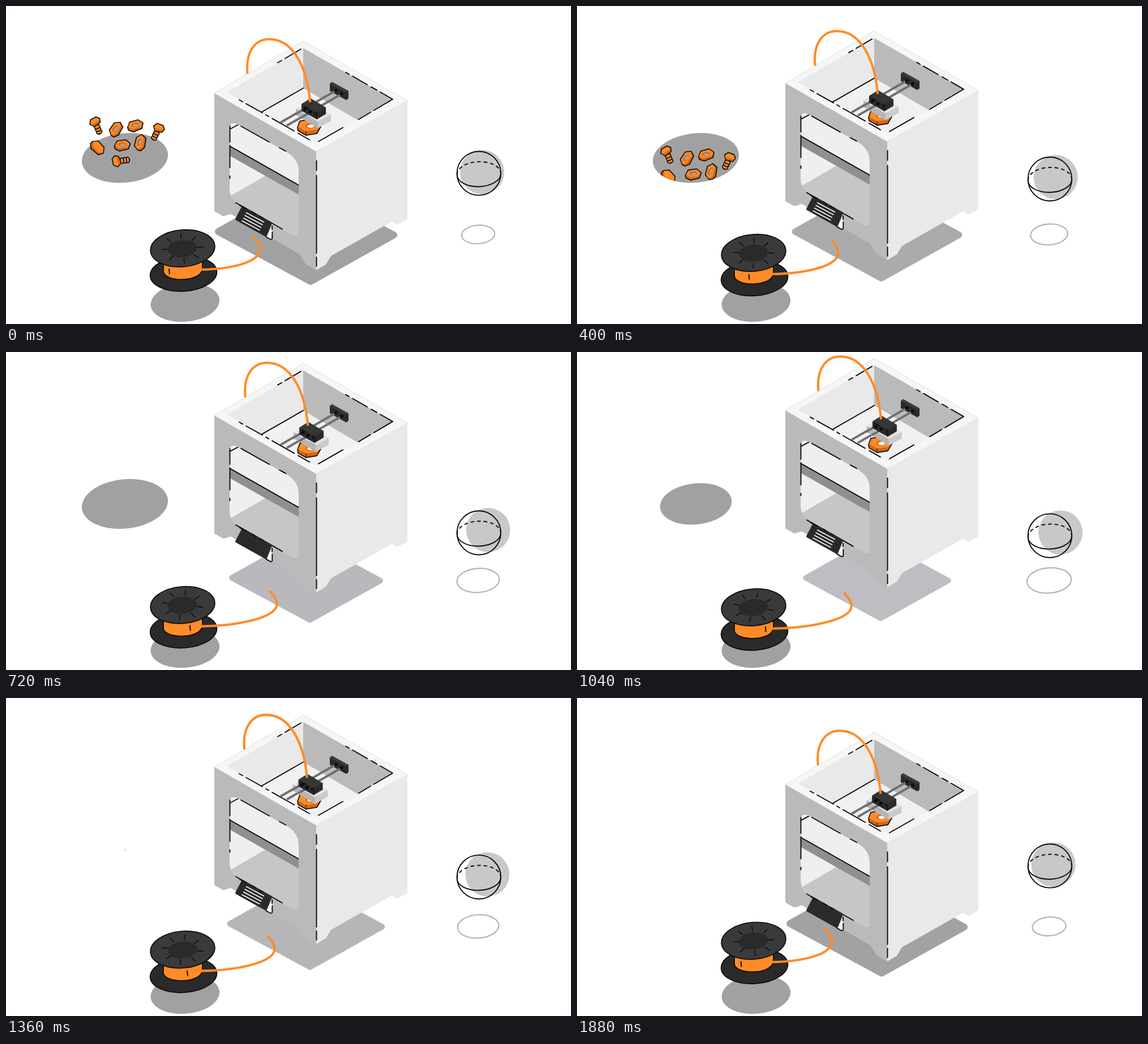
An HTML page that plays this animation: 998 by 561 pixels, repeating every 1920 ms.

```html
<!DOCTYPE html>
<html lang="en">
<head>
<meta charset="utf-8">
<title>3D printer</title>
<style>
  html, body { margin: 0; width: 100%; height: 100%; overflow: hidden; background: #fff; }
  svg { display: block; width: 998px; height: 561px; }
  .line { fill: none; stroke: #0a0a0a; stroke-width: 1.9; stroke-linecap: round; stroke-linejoin: round; }
  .tube { fill: none; stroke: #ff8b27; stroke-width: 4.1; stroke-linecap: round; }
  .part { stroke: #0a0a0a; stroke-width: 1.7; stroke-linejoin: round; }
  .orange { fill: #ff8b27; }
  .rust { fill: #d3671a; }
  .dark { fill: #2a2a2a; }
  .shade { fill: #a1a1a1; }
</style>
</head>
<body>
<svg viewBox="0 0 998 561">
  <defs>
    <clipPath id="above">
      <rect x="100" y="100" width="220" height="166"/>
      <ellipse cx="210" cy="268" rx="76.300" ry="43.600" transform="rotate(-6 210 268)"/>
    </clipPath>
    <clipPath id="window">
      <path d="M395 218Q395 202 409 209L496 258Q517 270 517 292V398Q517 409 505 403L411 349Q395 340 395 322Z"/>
    </clipPath>
    <clipPath id="opening"><path d="M525 74L684 165L549 243L390 152Z"/></clipPath>
  </defs>

  <path id="floorShadow" d="M375 398L522 316L685 404L538 486Z" stroke-width="12" stroke-linejoin="round"/>
  <ellipse class="shade" cx="316.300" cy="523" rx="61" ry="34" transform="rotate(-5 316 523)"/>
  <g id="hole"><ellipse class="shade" rx="76.300" ry="43.600" transform="rotate(-6)"/></g>
  <g clip-path="url(#above)"><g id="parts"></g></g>

  <g id="printer">
    <path fill="#f6f6f6" stroke="#dedede" stroke-width="1" d="M525 62L709 167L548 257L368 154Z"/>
    <g clip-path="url(#opening)">
      <path fill="#e9e9e9" d="M525 74V145L450 188L390 152Z"/>
      <path fill="#bababa" d="M525 74V145L622 202L684 165Z"/>
      <path fill="#f0f0f0" d="M525 145L622 202L549 243L450 188Z"/>
      <path class="line" d="M450 188L525 145"/>
    </g>
    <path fill="#bababa" d="M368 154L548 257V466L529 455L517 436L510 433L404 371L397 367L384 371L368 362Z"/>
    <path fill="#e9e9e9" d="M548 257L709 167V376L691 386L682 380L574 441L565 456L548 466Z"/>

    <g clip-path="url(#window)">
      <path fill="#efefef" d="M390 195H520V415H390Z"/>
      <path fill="#c6c6c6" d="M395 336L459 299L517 333V412H395Z"/>
      <path fill="#8f8f8f" d="M395 247L517 316V333L395 264Z"/>
      <path class="line" d="M395 247L517 316M396 217L411 209"/>
    </g>
    <path class="line" d="M415 212L465 240M483 250L494 256M395.500 212V240M395.500 246V285M395.500 300V304
      M406 347L488 393.500"/>

    <path fill="#f4f4f4" d="M470 384V409Q470 413 466 411L458 406Z"/>
    <path class="line" d="M470 388V394M470.300 399V409Q470 413 466 411L459 407"/>
    <path class="dark" stroke="#2a2a2a" stroke-width="4" stroke-linejoin="round" d="M418 355L468 383L459 405L407 376Z"/>
    <path class="line" d="M413 352L425 358M435 363L441 367M448 371L454 374"/>
    <path id="screen" fill="none" stroke="#fff" stroke-width="1.700"
      d="M424 364.500L456 381.500M421.500 369.200L453.500 386.200M419 374L451 391M416.500 378.700L448.500 395.700"/>

    <path class="line" d="M480 100L487 96M493 92.500L521 76
      M600 117L606 120.400M612 123.800L638 138.700M645 142.700L655 148.400M661 151.800L683 164.500L650 184M644 187.500L623 200M595 214.500L552 239
      M412 165.500L418 169M424 172.300L453 188.500M459 192L464 195M470 198.400L509 220.500M516 224.500L536 236
      M548.500 273V290M548.500 299V436M548.500 443V459"/>

    <path class="dark" d="M572 137L576 134L605 150V163L601 166L572 150Z"/>
    <path fill="#3c3c3c" d="M572 137L576 134L605 150L601 153Z"/>
    <path fill="none" stroke="#6f6f6f" stroke-width="4" d="M583 149L485 205.500M593 155L496 211"/>
    <path fill="none" stroke="#0a0a0a" stroke-width="5" stroke-linecap="round" d="M582 149.500L583 149M592 155.500L593 155"/>

    <path class="rust part" d="M515 214L519 203L537 200L556 213L549 225L530 228L516 220Z"/>
    <path class="orange" d="M516 213L520 204L537 201L555 212L549 218.500L530 221Z"/>
    <path class="line" style="stroke-width:1" d="M530 221V227"/>
    <ellipse cx="537" cy="211.500" rx="8" ry="4.500" class="rust"/>
    <ellipse cx="538" cy="212" rx="6" ry="3" fill="#f4f4f4"/>

    <g id="head">
      <path fill="#e2e2e2" d="M512 181L535 169L574 191.500L551 204Z"/>
      <path fill="#b5b5b5" d="M512 181L551 204V215.500L512 192Z"/>
      <path fill="#cacaca" d="M551 204L574 191.500V203L551 215.500Z"/>
      <path fill="none" stroke="#6f6f6f" stroke-width="4" d="M530 180L510 191.500M540 186L521 197"/>
      <path class="dark" d="M522 173L538 163L565 179V190.500L549 200L522 185Z"/>
      <path fill="#363636" d="M522 173L538 163L565 179L549 188Z"/>
      <path class="line" style="stroke-width:1.300" d="M549 188V199M526 176L536 182M546 187V193"/>
      <path fill="none" stroke="#0a0a0a" stroke-width="5" stroke-linecap="round" d="M528 182L529 181.500M537 187L538 186.500"/>
      <path class="tube" d="M426.500 118C423 79 441 58.500 465 58.500C508 58.500 532 110 537 168"/>
    </g>
  </g>

  <g id="spool">
    <ellipse class="dark part" cx="313.500" cy="472.200" rx="59" ry="31" transform="rotate(-4 313.500 472)"/>
    <path class="orange part" d="M278 445V469C281 487 342 488 347 465V445Z"/>
    <path id="mark" class="line" d="M0 -4.500L.8 4"/>
  </g>
  <path id="filament" class="tube"/>
  <g id="lid">
    <ellipse fill="#3a3a3a" class="part" cx="312" cy="427.500" rx="57" ry="32.500" transform="rotate(-5 312 427.500)"/>
    <ellipse class="dark" cx="311.500" cy="428" rx="26" ry="15" transform="rotate(-5 311.500 428)"/>
    <path id="ticks" class="line" style="stroke-width:1.500"/>
  </g>

  <circle id="ballShade" r="39" fill="#c8c8c8"/>
  <g id="ball" class="line">
    <circle r="38.700"/>
    <g transform="translate(0 1.500) rotate(-2)">
      <path d="M-38.700 0A38.700 22 0 0 0 38.700 0"/>
      <path d="M-38.700 0A38.700 22 0 0 1 38.700 0" stroke-dasharray="6.500 5" stroke-linecap="butt"/>
    </g>
  </g>
  <g transform="translate(834 403) rotate(-4)"><ellipse id="ring" fill="none" stroke="#b4b4b4" stroke-width="2.200"/></g>
</svg>

<script>
const LOOP = 1920, SWING = 2000;
const $ = id => document.getElementById(id);
const place = (id, x, y, more = '') => $(id).setAttribute('transform', `translate(${x} ${y}) ${more}`);
const mix = (a, b, k) => a + (b - a) * k;
const wave = (t, period) => (1 - Math.cos(2 * Math.PI * t / period)) / 2;
const smooth = s => { s = Math.min(1, Math.max(0, s)); return s * s * (3 - 2 * s); };

const nut = (x, y, turn, open = true) => `<g transform="translate(${x} ${y}) rotate(${turn})">
  <path class="rust part" d="M-14 1L-9 -8L6 -10L14 -3L11 6L-5 10L-13 6Z"/>
  <path class="orange" d="M-13 0L-8.500 -7L6 -9L13 -3L9 3L-6 5Z"/>
  ${open ? '<ellipse class="rust" cy="-1.500" rx="7" ry="4"/><ellipse cx=".5" cy="-.7" rx="5" ry="2.500" fill="#a8a19b"/>' : ''}</g>`;

const bolt = (x, y, turn) => `<g transform="translate(${x} ${y}) rotate(${turn})">
  <path class="rust part" d="M-4 5L-4 20Q0 27 4 20L4 5Z"/>
  ${[20, 15, 10].map(v => `<ellipse class="orange part" cy="${v}" rx="5" ry="3.200"/>`).join('')}
  <path class="orange part" d="M-10 1L-6 -6L5 -7L10 -2L8 5L-4 8Z"/>
  <path class="rust" d="M-9 2L-4 3L8 1L7 4.500L-4 7Z"/></g>`;

$('parts').innerHTML = bolt(157, 204, -23) + bolt(270, 215, 25) + bolt(195, 274, -97) +
  nut(194.5, 217.5, -48) + nut(228.5, 211.5, -8) + nut(161.5, 250, 55, false) +
  nut(205.5, 246, 0) + nut(237.5, 241, -68);

// Rises as a half cosine, then sinks with a slightly early ease.
function lift(t) {
  const top = SWING / 2;
  if (t < top) return wave(t, SWING);
  const x = (t - top) / top;
  return 1 - smooth(x + .23 * x * (1 - x));
}

function spokes(turn) {
  let d = '';
  for (let k = 0; k < 8; k++) {
    const a = (turn + 45 * k) * Math.PI / 180, c = Math.cos(a), s = Math.sin(a);
    d += `M${312 + 26 * c} ${427.5 + 17.5 * s}L${312 + 36 * c} ${427.5 + 26 * s}`;
  }
  return d;
}

function draw(t) {
  const p = wave(t, SWING);

  place('printer', 0, -51 * lift(t));
  const slide = 6.7 * wave(t, SWING / 2);
  place('head', -slide, slide * .575);
  $('screen').style.display = t % 1000 < 500 ? '' : 'none';

  place('floorShadow', 530, 400, `scale(${1 - .19 * p}) translate(-530 -400)`);
  const tone = `rgb(${mix(161, 191, p)},${mix(161, 189, p)},${mix(161, 194, p)})`;
  $('floorShadow').setAttribute('fill', tone);
  $('floorShadow').setAttribute('stroke', tone);

  const size = 1 - smooth((t - 915) / 485);
  $('hole').style.display = size > 0 ? '' : 'none';
  place('hole', 210, 268, `scale(${size})`);
  $('parts').style.display = t < 800 ? '' : 'none';
  place('parts', 0, 148 * p);

  const drop = 23 * p, x = 288 + 45 * p;
  place('spool', 0, drop);
  place('lid', 0, drop);
  place('mark', x, 470.5 - .006 * (x - 306) ** 2);
  $('ticks').setAttribute('d', spokes(-95 + 17 * p));

  const dx = 36 * p, dy = 20 * p, y = 465 + drop;
  $('filament').setAttribute('d', `M345 ${y}C${mix(400, 415, p)} ${y - 1} ${449 + dx} ${452 + dy}
    ${449 + dx} ${428 + dy}C${449 + dx} ${419 + dy} ${442 + dx} ${412 + dy} ${437 + dx} ${406 + dy}`);

  place('ball', 835.3, 295.2 + 29 * p);
  place('ballShade', 841 + 13 * p, 293 + 25.5 * p);
  $('ring').setAttribute('rx', mix(29.3, 39.3, p));
  $('ring').setAttribute('ry', mix(16.3, 22.3, p));
}

const start = performance.now();
function tick() {
  draw((performance.now() - start) % LOOP);
  requestAnimationFrame(tick);
}
tick();
</script>
</body>
</html>
```
